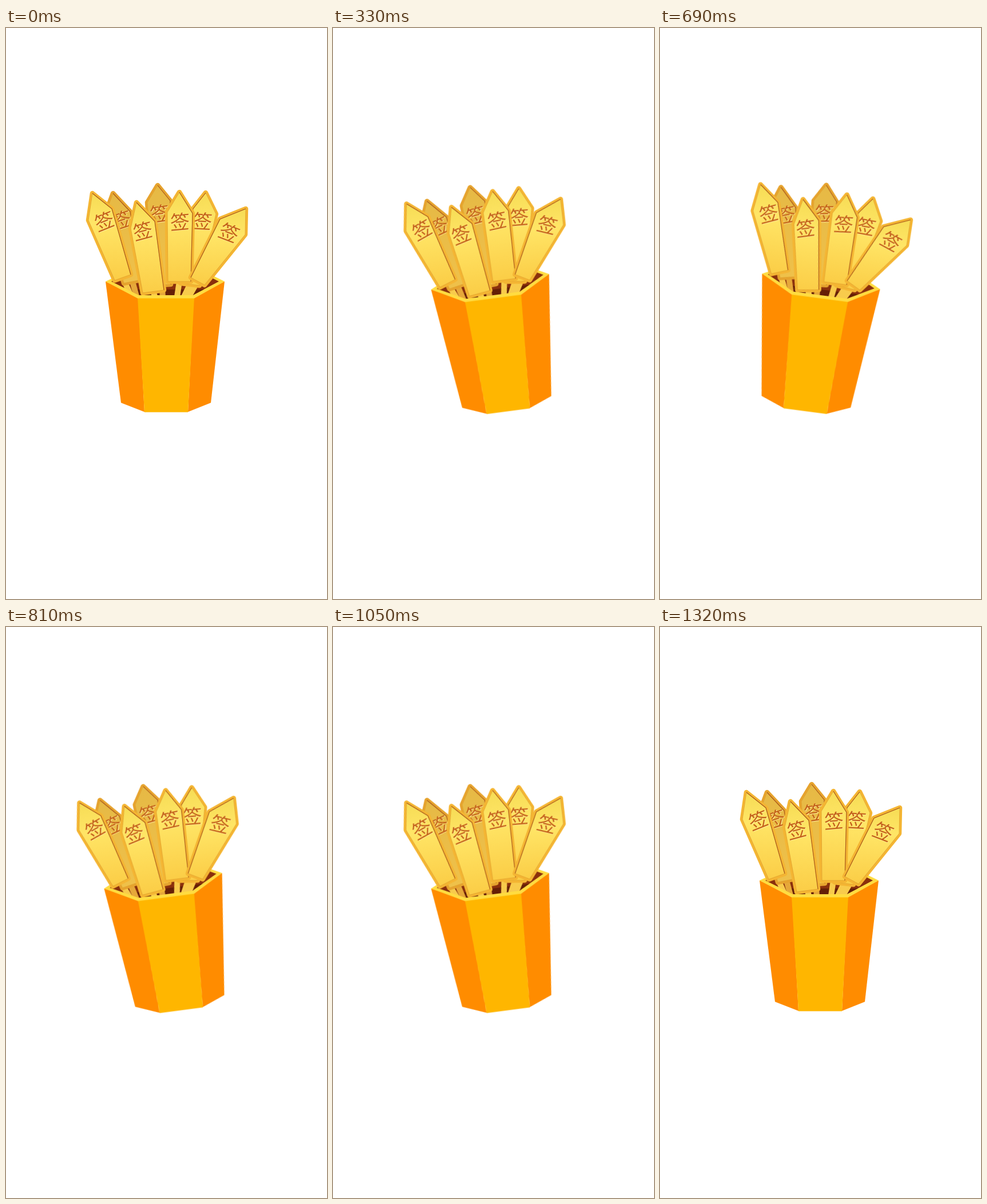
Write an HTML page that moves like this. It is 561 px wide and 998 px high and loops after 1420 ms.

```html
<!DOCTYPE html>
<html lang="zh">
<head>
<meta charset="utf-8">
<title>签筒</title>
<style>
  html, body { margin: 0; width: 100%; height: 100%; overflow: hidden; background: #fff; }
  svg { display: block; width: 561px; height: 998px; }

  /* Shake in 30 ms steps of 7.5deg, then rest for 100 ms */
  #pot {
    transform-origin: 280.5px 470px;
    animation: shake 1420ms steps(4) infinite;
  }
  @keyframes shake {
    0% { transform: rotate(0deg); animation-timing-function: steps(2); }
    4.225%, 21.126%, 38.028%, 54.929%, 71.83% { transform: rotate(-15deg); }
    12.676%, 29.577%, 46.478%, 63.38%, 80.281% { transform: rotate(15deg); }
    88.732% { transform: rotate(-15deg); animation-timing-function: steps(2); }
    92.957%, 100% { transform: rotate(0deg); }
  }

  .edge { stroke-width: 8.5; stroke-linejoin: round; }
  .face { stroke: #e0a02c; stroke-width: .8; }
  .groove { fill: none; stroke: #a8561a; stroke-width: 1.1; stroke-linejoin: round; }
  text {
    font: 500 34px "Noto Sans CJK SC", "Noto Sans CJK JP", "Noto Sans CJK", sans-serif;
    text-anchor: middle;
  }
</style>
</head>
<body>
<svg viewBox="0 0 561 998">
  <defs>
    <linearGradient id="bright" x2="0" y2="1">
      <stop offset="0" stop-color="#f6dc55"/>
      <stop offset=".35" stop-color="#ffe566"/>
      <stop offset="1" stop-color="#fbcd46"/>
    </linearGradient>
    <linearGradient id="dim" x2="0" y2="1">
      <stop offset="0" stop-color="#e6b945"/>
      <stop offset="1" stop-color="#efc14a"/>
    </linearGradient>
  </defs>
  <g id="pot">
    <path fill="#ffdc41" d="M174 443 231 416H328L382 443 328 472H231Z"/>
    <path fill="#8a300c" d="M184 443 232 420H327L372 443 327 467H232Z"/>
    <path fill="#651f06" d="M212 457H346L327 467H232Z"/>
    <g id="handles" stroke-width="10"></g>
    <g id="sticks"></g>
    <path fill="#ff8c00" d="M174 443 231 471 242 671 201 655Z"/>
    <path fill="#ff8c00" d="M328 471 382 443 358 655 318 671Z"/>
    <path fill="#ffb600" d="M230 471H329L318 671.5H242Z"/>
    <path fill="#ffdc41" d="M174 443 183 443 232 467H327L373 443H382L329 472.5H230Z"/>
  </g>
</svg>
<script>
  const NS = 'http://www.w3.org/2000/svg';
  const $ = id => document.getElementById(id);

  function add(parent, tag, attrs, text) {
    const el = document.createElementNS(NS, tag);
    for (const k in attrs) el.setAttribute(k, attrs[k]);
    if (text) el.textContent = text;
    parent.append(el);
  }

  // pts: tip, right shoulder, right base, left base, left shoulder
  // sign: centre and angle of the character; foot: handle end
  const sticks = [
    { pts: [[265,275],[287,302],[288,448],[258,450],[247,305]], sign: [268,325,-3], foot: [274,476], dim: true },
    { pts: [[187,289],[217,321],[236,440],[206,446],[172,330]], sign: [202,336,-13], foot: [230,476], dim: true },
    { pts: [[349,288],[367,325],[338,450],[305,446],[327,316]], sign: [343,338,8], foot: [308,476], left: true },
    { pts: [[151,289],[185,316],[218,431],[190,441],[144,336]], sign: [172,338,-17], foot: [222,476] },
    { pts: [[228,305],[260,338],[276,458],[239,463],[218,350]], sign: [239,355,-10], foot: [262,476] },
    { pts: [[303,287],[326,324],[323,443],[283,443],[282,322]], sign: [304,339,0], foot: [298,476] },
    { pts: [[419,316],[418,361],[347,449],[323,436],[374,334]], sign: [390,358,26], foot: [316,476], left: true }
  ];

  for (const { pts, sign: [x, y, angle], foot, dim, left } of sticks) {
    const edge = dim ? '#e6a32e' : '#f4b533';
    const [, , br, bl] = pts;
    add($('handles'), 'line', {
      x1: (br[0] + bl[0]) / 2, y1: (br[1] + bl[1]) / 2,
      x2: foot[0], y2: foot[1], stroke: dim ? '#e6a83a' : '#f8cb4c'
    });

    const box = $('sticks');
    add(box, 'polygon', { class: 'edge', points: pts, fill: edge, stroke: edge });
    add(box, 'polygon', { class: 'face', points: pts, fill: dim ? 'url(#dim)' : 'url(#bright)' });
    const side = left ? [pts[0], pts[4], pts[3]] : pts.slice(0, 3);
    add(box, 'polyline', { class: 'groove', points: side });

    const turn = `translate(${x} ${y}) rotate(${angle}) skewY(-5)`;
    add(box, 'text', { transform: turn, x: .9, y: 13.4, fill: '#ffec94' }, '签');
    add(box, 'text', { transform: turn, y: 12.5, fill: '#c4621a' }, '签');
  }
</script>
</body>
</html>
```
